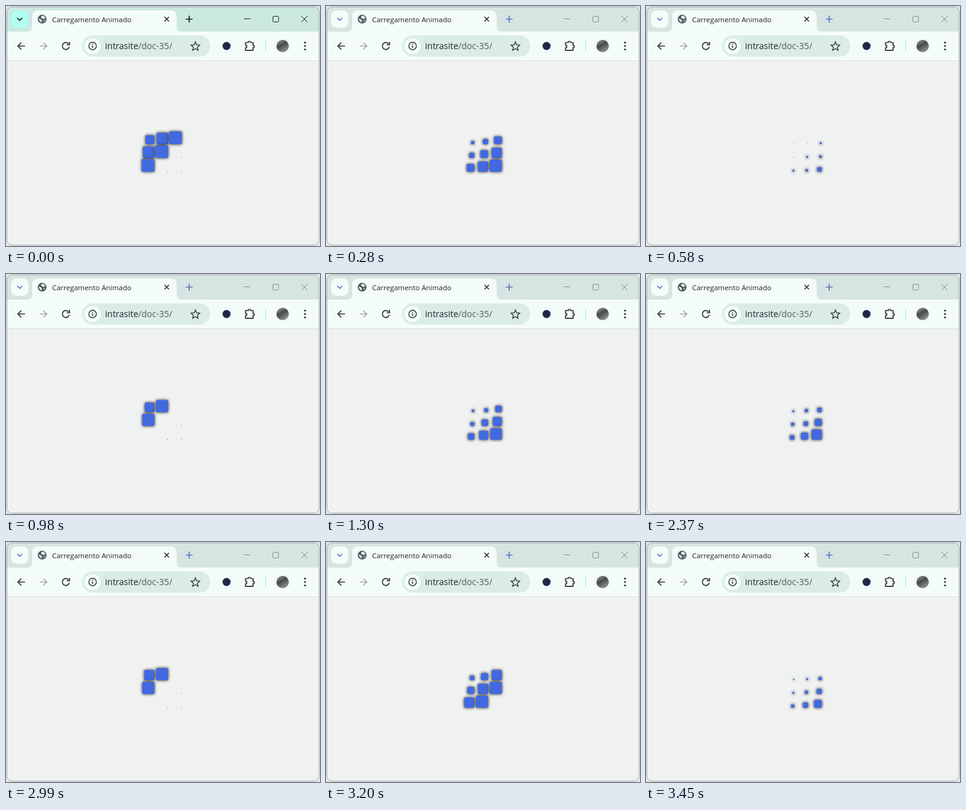
An HTML page with a canvas that plays this animation: 504x384 px, repeating every 3.5 s.

```html
<!DOCTYPE html>
<html lang="pt">
<head>
<meta charset="utf-8">
<title>Carregamento Animado</title>
<style>
  html, body { margin: 0; width: 504px; height: 384px; overflow: hidden; background: #e4e8e7; }
  svg, canvas { position: absolute; left: 0; top: 0; }
  text { font-family: "Open Sans", "Noto Sans", sans-serif; }
  .line { fill: none; stroke: #303536; stroke-width: 1.7; }
  svg { --strip: #d6e5e1; --button: #f4fcfa; --accent: #5b78bd; --control: #858d8b; }
  svg.active { --strip: #cbe8e1; --button: #b0fff1; --accent: #17201e; --control: #1c2321; }
  .accent { stroke: var(--accent); }
  .control { stroke: var(--control); stroke-width: 1; }
</style>
</head>
<body>
<svg id="browser" class="active" width="504" height="384">
  <defs>
    <clipPath id="frame"><rect x="1" y="1" width="502" height="382" rx="8"/></clipPath>
    <linearGradient id="avatar" x2=".6" y2="1">
      <stop stop-color="#a5aaa8"/><stop offset=".5" stop-color="#454a4a"/><stop offset="1" stop-color="#8f9593"/>
    </linearGradient>
  </defs>
  <g clip-path="url(#frame)">
    <rect width="504" height="42" fill="var(--strip)"/>
    <rect y="41" width="504" height="46" fill="#f4fcfa"/>
    <rect y="87" width="504" height="297" fill="#f0f1f1"/>
    <rect y="87" width="504" height="1" fill="#d7e5e1"/>
    <path d="M34 41q8 0 8-8V17q0-10 10-10H264q10 0 10 10V33q0 8 8 8z" fill="#f4fcfa"/>
  </g>
  <rect x="1.5" y="1.5" width="501" height="381" rx="8" fill="none" stroke="#a3a9a7"/>

  <rect x="8" y="7" width="28" height="28" rx="9" fill="var(--button)"/>
  <path class="line accent" d="M18 19l4 4 4-4"/>
  <circle cx="58" cy="21" r="7" fill="#4c575b"/>
  <path d="M52.500 20l3 1 2 2v3l-2-.5-2-2.500zM58 15.500l3 .5 2 3-2 2-3-1-2-2zM60.500 23l2.500-.5-2 3z" fill="#edf5f3"/>
  <text x="74" y="26" font-size="11.4" fill="#1e2423">Carregamento Animado</text>
  <path class="line" d="M254.500 17.500l7 7m0-7l-7 7"/>
  <path class="line accent" d="M288.500 21h11M294 15.500v11"/>
  <path class="line control" d="M382 20.500h10M474 16l10 10m0-10l-10 10"/>
  <rect class="line control" x="428.500" y="16.500" width="9" height="9" rx="1"/>

  <path class="line" d="M30.500 64H19m5.500-5.500L19 64l5.500 5.500"/>
  <path class="line" d="M54 64h11.500M60 58.500l5.500 5.500-5.500 5.500" style="stroke:#a3aaa8"/>
  <path class="line" d="M100.500 60.500a5.600 5.600 0 1 0 1 5M102 57.500v4.500h-4.500"/>
  <rect x="122" y="47" width="206" height="34" rx="17" fill="#dbece7"/>
  <circle cx="139" cy="64" r="13" fill="#f4fcfa"/>
  <circle class="line" cx="139" cy="64" r="6" style="stroke-width:1.4"/>
  <path class="line" d="M139 60.500v1.500m0 1v4.500" style="stroke-width:1.500"/>
  <text x="159" y="69" font-size="14" fill="#1d2930">intrasite<tspan fill="#4c605c">/doc-35/</tspan></text>
  <path class="line" d="M304 57.500l2 4.700 5 .4-3.800 3.300 1.200 5-4.400-2.700-4.400 2.700 1.200-5-3.800-3.300 5-.4z" style="stroke-width:1.300"/>
  <circle cx="354" cy="64" r="6.500" fill="#202947"/>
  <path class="line" d="M384.500 58.500h4.200a2 2 0 0 1 4 0h3.800v4.300a2 2 0 0 1 0 4v4h-12v-4a2 2 0 0 0 0-4z"/>
  <rect x="416" y="56" width="2" height="16" rx="1" fill="#b2f6e8"/>
  <circle cx="444" cy="64" r="10" fill="url(#avatar)"/>
  <g fill="#303536"><circle cx="480" cy="58.500" r="1.600"/><circle cx="480" cy="64" r="1.600"/><circle cx="480" cy="69.500" r="1.600"/></g>
</svg>
<canvas id="loader" width="504" height="384"></canvas>
<script>
const LOOP = 3500, PERIOD = 1002, STAGGER = 0.1;
const HOLD = 50, RESYNC = [0, 580, 1150, 1700, 2270, 2820, 3350];
const browser = document.getElementById('browser');
const ctx = document.getElementById('loader').getContext('2d');

// CSS "ease": cubic-bezier(.25, .1, .25, 1)
function ease(x) {
  const bezier = (a, b, s) => 3 * a * s * (1 - s) ** 2 + 3 * b * s * s * (1 - s) + s ** 3;
  let low = 0, high = 1;
  for (let i = 0; i < 20; i++) {
    const mid = (low + high) / 2;
    if (bezier(0.25, 0.25, mid) < x) low = mid; else high = mid;
  }
  return bezier(0.1, 1, low);
}

// Each square shrinks towards its lower right corner.
function drawSquare(right, bottom, progress) {
  if (progress > 0.96) return;
  const size = Math.max(1, Math.round(20 * (1 - ease(progress))));
  const dot = size === 1;
  ctx.fillStyle = dot ? '#55585c' : '#4169e1';
  ctx.shadowColor = dot ? 'transparent' : '#000';
  ctx.shadowBlur = 5;
  ctx.beginPath();
  ctx.roundRect(right - size, bottom - size, size, size, size > 6 ? 1 : 0);
  ctx.fill();
}

function render() {
  const t = performance.now() % LOOP;
  const start = RESYNC.findLast(s => s <= t);
  const held = start + Math.floor((t - start) / HOLD) * HOLD;
  browser.classList.toggle('active', t < HOLD);
  ctx.clearRect(0, 0, 504, 384);
  for (let row = 0; row < 3; row++) {
    for (let col = 0; col < 3; col++) {
      const phase = (held + 202) / PERIOD - STAGGER * (row + col) + 1;
      drawSquare(238 + 22 * col, 221 + 22 * row, phase % 1);
    }
  }
  requestAnimationFrame(render);
}
render();
</script>
</body>
</html>
```
